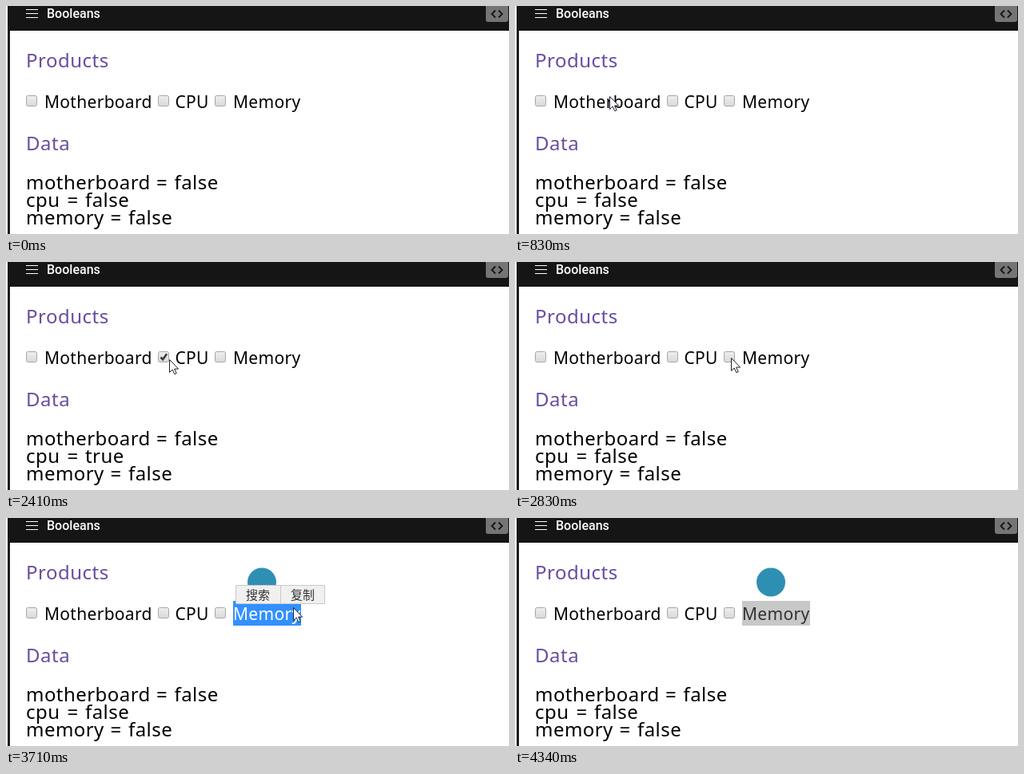
Animation, 629 px wide and 286 px high, one loop 4.41 s. Source, as an HTML page:

```html
<!DOCTYPE html>
<html lang="en">
<head>
<meta charset="utf-8">
<title>Booleans</title>
<style>
  html, body { margin: 0; width: 100%; height: 100%; overflow: hidden; background: #fff; }
  svg { display: block; width: 629px; height: 286px; }
  text { font-family: "Noto Sans", "Open Sans", sans-serif; white-space: pre; }
  .title { font: 500 16px Roboto, sans-serif; fill: #fff; }
  .head { font-size: 24px; fill: #684d9f; letter-spacing: .5px; }
  .label { font-size: 21px; letter-spacing: .3px; }
  .data { font-size: 24px; letter-spacing: .45px; }
  .menu text { font: 15px "Noto Sans CJK SC", "Noto Sans CJK", sans-serif; fill: #333; }
</style>
</head>
<body>
<svg viewBox="0 0 629 286">
  <defs>
    <linearGradient id="face" x2="0" y2="1">
      <stop offset="0" stop-color="#eee"/>
      <stop offset="1" stop-color="#dadada"/>
    </linearGradient>
  </defs>

  <rect x="2" width="3" height="286" fill="#1d1d1f"/>
  <rect x="2" width="627" height="31" fill="#151515"/>
  <path d="M25 4.5h15M25 9.5h15M25 14.5h15" stroke="#fff"/>
  <text class="title" x="51" y="15">Booleans</text>
  <rect x="600" y="-4" width="28" height="24" rx="3" fill="#757575"/>
  <path d="M612 5.5l-4.5 4.5 4.5 4.5M616 5.5l4.5 4.5-4.5 4.5" fill="none" stroke="#151515" stroke-width="1.8"/>

  <text class="head" x="25" y="77">Products</text>
  <text class="head" x="25" y="181">Data</text>

  <rect id="mark" x="284" y="104" width="85" height="31"/>
  <g id="boxes"></g>
  <g id="rows"></g>

  <circle id="badge" cx="320" cy="80.5" r="18" fill="#2f8fb3"/>
  <g id="menu" class="menu">
    <path d="M287.5 84.5h111v23h-111zM343.5 84.5v23" fill="#f0f0f0" stroke="#c9c9c9"/>
    <text x="300" y="102">搜索</text>
    <text x="356" y="102">复制</text>
  </g>

  <path id="cursor" d="M.5.5v16l3.7-3.5 2.6 5.7 2.4-1-2.6-5.6h5z" fill="#fff" stroke="#1c2030"/>
</svg>

<script>
  const LOOP = 4410, STEP = 70;
  const $ = id => document.getElementById(id);

  const linear = p => p;
  const easeIn = p => 1 - Math.cos(p * Math.PI / 2);
  const easeOut = p => Math.sin(p * Math.PI / 2);

  // pointer tip: time, x, y and the easing used to get there
  const keys = [
    [70, 523, 4],
    [560, 122, 105, easeOut],
    [830, 118, 113, linear],
    [1190, 122, 117, linear],
    [1350, 122, 117, linear],
    [1590, 152, 121, easeIn],
    [2010, 197, 119, easeOut],
    [2200, 197, 119, linear],
    [2410, 204, 122, linear],
    [2480, 205, 122, linear],
    [3060, 285, 120, easeOut],
    [3430, 286, 120, linear],
    [3710, 359, 112, easeIn],
    [4060, 538, 1, easeOut]
  ];

  const pointerOn = [70, 4130], menuOn = [3640, 4130], badgeOn = [3710, LOOP];
  const selected = [3430, LOOP], blurred = [4200, LOOP];

  const items = [
    { label: 'Motherboard', boxX: 25, labelX: 48, valueX: 210.5, on: [1020, 1350] },
    { label: 'CPU', boxX: 190, labelX: 211.5, valueX: 99, on: [2010, 2480] },
    { label: 'Memory', boxX: 261, labelX: 284, valueX: 153, on: [3060, 3500] }
  ];

  function add(parent, tag, attrs, text = '') {
    const el = document.createElementNS('http://www.w3.org/2000/svg', tag);
    for (const key in attrs) el.setAttribute(key, attrs[key]);
    el.textContent = text;
    return parent.appendChild(el);
  }

  items.forEach((it, i) => {
    const x = it.boxX, y = 230 + 22 * i;
    const data = (dx, text) => add($('rows'), 'text', { class: 'data', x: dx, y }, text);
    add($('boxes'), 'rect', { x: x + .5, y: 112.5, width: 13, height: 13, rx: 2, fill: 'url(#face)', stroke: '#a6a6a6' });
    it.tick = add($('boxes'), 'path', {
      d: `M${x + 3.5} 119.5l2.6 2.8 5-7`, fill: 'none', stroke: '#3c3c3c', 'stroke-width': 2.6
    });
    it.text = add($('boxes'), 'text', { class: 'label', x: it.labelX, y: 128 }, it.label);
    data(25, it.label.toLowerCase());
    data(it.valueX - 22.5, '=');
    it.value = data(it.valueX);
  });

  const within = (t, [from, to]) => t >= from && t < to;
  const show = (el, yes) => el.setAttribute('visibility', yes ? 'visible' : 'hidden');

  function tipAt(t) {
    const i = keys.findIndex(k => k[0] > t);
    if (i < 1) return keys.at(i).slice(1, 3);
    const [t0, x0, y0] = keys[i - 1], [t1, x1, y1, ease] = keys[i];
    const held = Math.floor((t - t0) / STEP) * STEP;
    const p = ease(held / (t1 - t0));
    return [x0 + (x1 - x0) * p, y0 + (y1 - y0) * p].map(Math.round);
  }

  function draw(t) {
    for (const it of items) {
      const on = within(t, it.on);
      show(it.tick, on);
      it.value.textContent = on;
    }

    const sel = within(t, selected), grey = within(t, blurred);
    show($('mark'), sel);
    $('mark').setAttribute('fill', grey ? '#c8c8c8' : '#3390ff');
    items[2].text.setAttribute('fill', grey ? '#323232' : sel ? '#fff' : '#000');

    show($('badge'), within(t, badgeOn));
    show($('menu'), within(t, menuOn));
    show($('cursor'), within(t, pointerOn));
    $('cursor').setAttribute('transform', `translate(${tipAt(t)})`);
  }

  const start = performance.now();
  function frame(now) {
    draw(Math.max(0, now - start) % LOOP);
    requestAnimationFrame(frame);
  }
  draw(0);
  requestAnimationFrame(frame);
</script>
</body>
</html>
```
